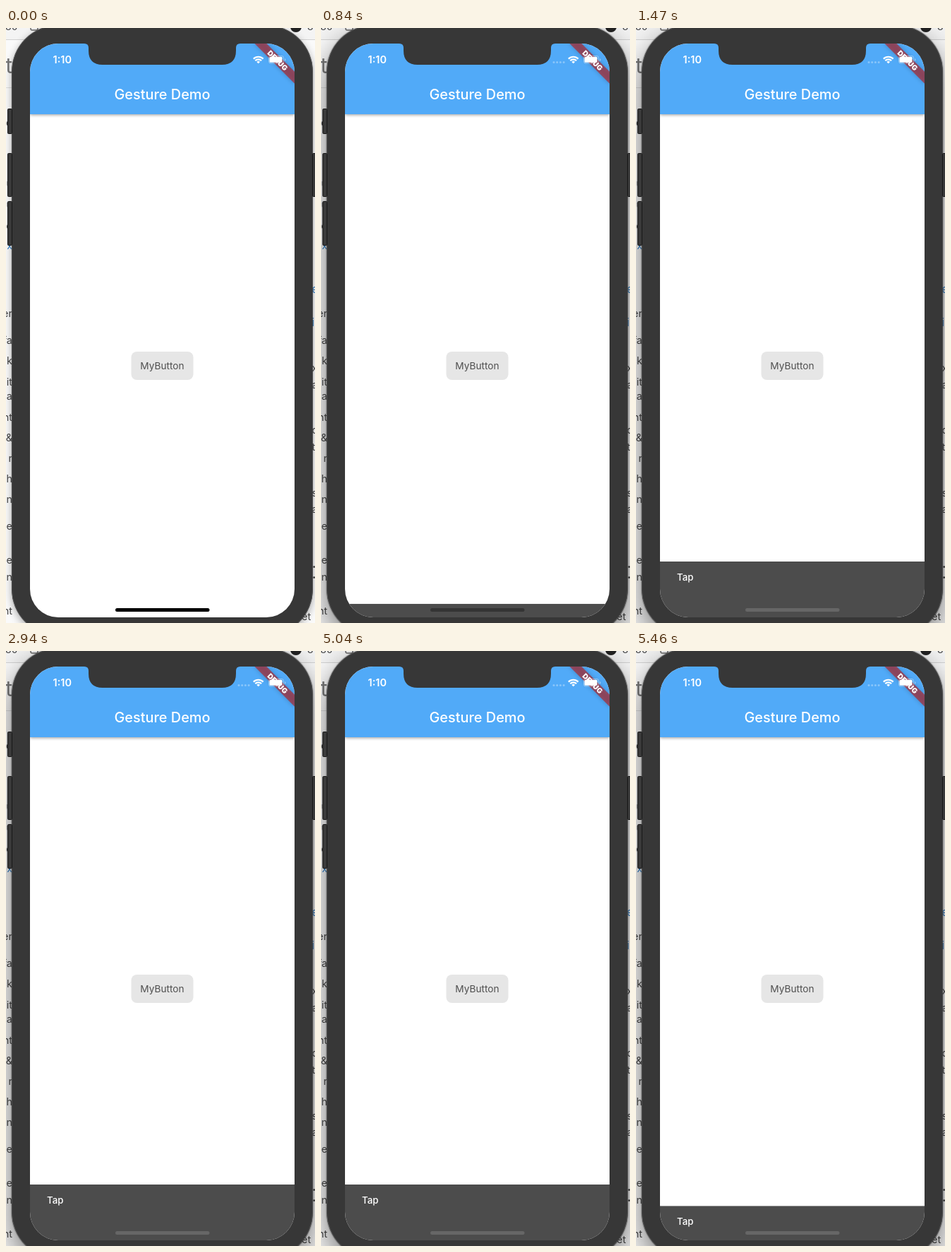
Recreate the animation shown at these times as an HTML page. Size 438 by 842 pixels, loop 5.53 s.

```html
<!DOCTYPE html>
<html lang="en">
<head>
<meta charset="utf-8">
<style>
  html, body { margin: 0; width: 100%; height: 100%; overflow: hidden; background: #fafafa; }
  body { position: relative; }
  svg { position: absolute; left: 0; top: 0; font-family: Inter, "Open Sans", sans-serif; }
  #case {
    position: absolute; left: 8px; top: -4px; width: 427px; height: 864px;
    box-sizing: border-box; border-radius: 66px;
    background: #373737; border: 1px solid #4b4b4b;
    box-shadow: 0 4px 12px rgba(0,0,0,.32), 0 0 1px #555;
  }
  #case.active { box-shadow: 0 18px 44px rgba(0,0,0,.52), 0 0 2px #444; }
  #appbar { filter: drop-shadow(0 1px 2px rgba(0,0,0,.4)); }
  #ribbon { filter: drop-shadow(0 0 3px rgba(0,0,0,.35)); }
</style>
</head>
<body>
<svg id="page" width="438" height="842">
  <rect width="438" height="16" fill="#f4f4f4"/>
  <path d="M0 16.5H438" stroke="#d2d2d2"/>
  <path d="M0 84.5H8" stroke="#ddd"/>
  <rect x="35" y="-8" width="10" height="11" rx="2" fill="none" stroke="#666" stroke-width="1.5"/>
  <circle cx="411" cy="-2" r="8" fill="#222"/>
</svg>
<div id="case"></div>
<svg width="438" height="842">
  <defs>
    <clipPath id="screen"><rect x="34" y="22" width="375" height="812" rx="40"/></clipPath>
  </defs>
  <g fill="#3a3a3a" stroke="#161616">
    <rect x="2.5" y="114.5" width="6" height="35" rx="1"/>
    <rect x="2.5" y="177.5" width="6" height="61" rx="1"/>
    <rect x="2.5" y="245.5" width="6" height="62" rx="1"/>
    <rect x="434.5" y="177.5" width="6" height="61" rx="1"/>
  </g>
  <g clip-path="url(#screen)">
    <rect x="34" y="22" width="375" height="812" fill="#fff"/>
    <rect id="appbar" x="34" y="22" width="375" height="100" fill="#51aaf8"/>
    <text x="221.5" y="101" font-size="19.9" font-weight="500" fill="#fff" text-anchor="middle">Gesture Demo</text>

    <rect x="177.5" y="458" width="88" height="40" rx="8" fill="#e6e6e6"/>
    <text x="221.5" y="483" font-size="13.7" fill="#505050" text-anchor="middle">MyButton</text>

    <g id="snack">
      <rect x="34" y="755" width="375" height="80" fill="#4c4c4c"/>
      <text id="label" x="58" y="782" font-size="13.3" font-weight="500" fill="#fff">Tap</text>
    </g>
    <rect id="home" x="155" y="821" width="133.5" height="5" rx="2.5"/>

    <g transform="translate(409 22) rotate(45)">
      <rect id="ribbon" x="-40" y="28" width="80" height="12" fill="#b71c1c" fill-opacity=".627"/>
      <text y="37.7" font-size="10.2" font-weight="900" fill="#fff" text-anchor="middle">DEBUG</text>
    </g>

    <text x="66.5" y="50" font-size="14.5" font-weight="600" fill="#fff">1:10</text>
    <g id="dots" fill="#fff" opacity=".32">
      <circle cx="330" cy="48.5" r="1.5"/><circle cx="334.7" cy="48.5" r="1.5"/>
      <circle cx="339.4" cy="48.5" r="1.5"/><circle cx="344.1" cy="48.5" r="1.5"/>
    </g>
    <g fill="none" stroke="#fff" stroke-width="2.2">
      <path d="M350.8 43.6a9.8 9.8 0 0 1 13.8 0M353.3 46.3a6.2 6.2 0 0 1 8.8 0"/>
      <path d="M357.7 50.2L355.4 47.9a3.3 3.3 0 0 1 4.6 0Z" fill="#fff" stroke="none"/>
    </g>
    <rect x="372.5" y="39.5" width="21" height="10.5" rx="2.6" fill="none" stroke="#fff" stroke-opacity=".4"/>
    <rect x="373.5" y="40.8" width="18" height="8" rx="1.5" fill="#fff"/>
    <path d="M395 43v4q1.6-.6 1.6-2t-1.6-2" fill="#fff" opacity=".4"/>

    <path d="M111 21v1q6 0 6 6v4q0 20 20 20H306q20 0 20-20v-4q0-6 6-6v-1Z" fill="#373737"/>
  </g>
</svg>
<script>
const LOOP = 5530, STEP = 70, SLIDE = 262;
const FOCUS = 630, SHOW = 774, HIDE = 5303, BAR = 79;
const $ = id => document.getElementById(id);
const clamp = v => Math.max(0, Math.min(1, v));

// Slivers of the page that show beside the phone: [text, middle y, size, colour]
const INK = '#444', LINK = '#2f7fc8';
const left = [
  ['t', 53, 30, '#777'], ['d', 134], ['t', 182], ['u', 220], ['u', 250], ['o', 280], ['x', 308, 14, LINK],
  ['er', 404], ['fa', 442], ['ck', 471], ['it', 501], ['na', 521], ['nt', 551], ['&', 580], ['r', 609],
  ['ch', 638], ['n', 667], ['e', 705], ['ce', 753], ['on', 777], ['nt', 825]
];
const right = [
  ['e', 370, 15, LINK], ['i', 417, 15, LINK], ['x', 481], ['a', 505], ['o', 569], ['t', 593],
  ['s', 658], ['a', 681], ['.', 756, 22], ['.', 771, 22]
];

function write(x, anchor, [text, y, size = 14.5, fill = INK]) {
  const el = document.createElementNS('http://www.w3.org/2000/svg', 'text');
  const attrs = { x, y: y + size * .35, 'font-size': size, fill, 'text-anchor': anchor };
  for (const key in attrs) el.setAttribute(key, attrs[key]);
  el.textContent = text;
  $('page').append(el);
}
left.forEach(row => write(9, 'end', row));
right.forEach(row => write(433.5, 'start', row));
write(-1, 'start', ['80', -2, 14]);
write(427, 'start', ['8', -2, 14]);
write(419, 'start', ['et', 833]);

// Cubic Bezier (.4, 0, .2, 1), solved by bisection
function ease(x) {
  if (x <= 0 || x >= 1) return clamp(x);
  let lo = 0, hi = 1, s;
  for (let i = 0; i < 24; i++) {
    s = (lo + hi) / 2;
    const r = 1 - s;
    if (1.2 * r * r * s + .6 * r * s * s + s ** 3 < x) lo = s; else hi = s;
  }
  return s * s * (3 - 2 * s);
}

function draw(now) {
  const t = Math.floor(now % LOOP / STEP) * STEP;
  const enter = clamp((t - SHOW) / SLIDE);
  const leave = clamp((t - HIDE) / SLIDE);
  const shown = ease(Math.min(enter, 1 - leave));
  $('case').classList.toggle('active', t >= FOCUS);
  $('dots').style.display = t >= FOCUS ? '' : 'none';
  $('snack').setAttribute('transform', `translate(0 ${(1 - shown) * BAR})`);
  $('label').setAttribute('opacity', clamp((enter - .72) / .28));
  const grey = Math.round(102 * clamp((t - SHOW) / 130));
  $('home').setAttribute('fill', `rgb(${grey},${grey},${grey})`);
}

const start = performance.now();
function tick() {
  draw(performance.now() - start);
  requestAnimationFrame(tick);
}
tick();
</script>
</body>
</html>
```
